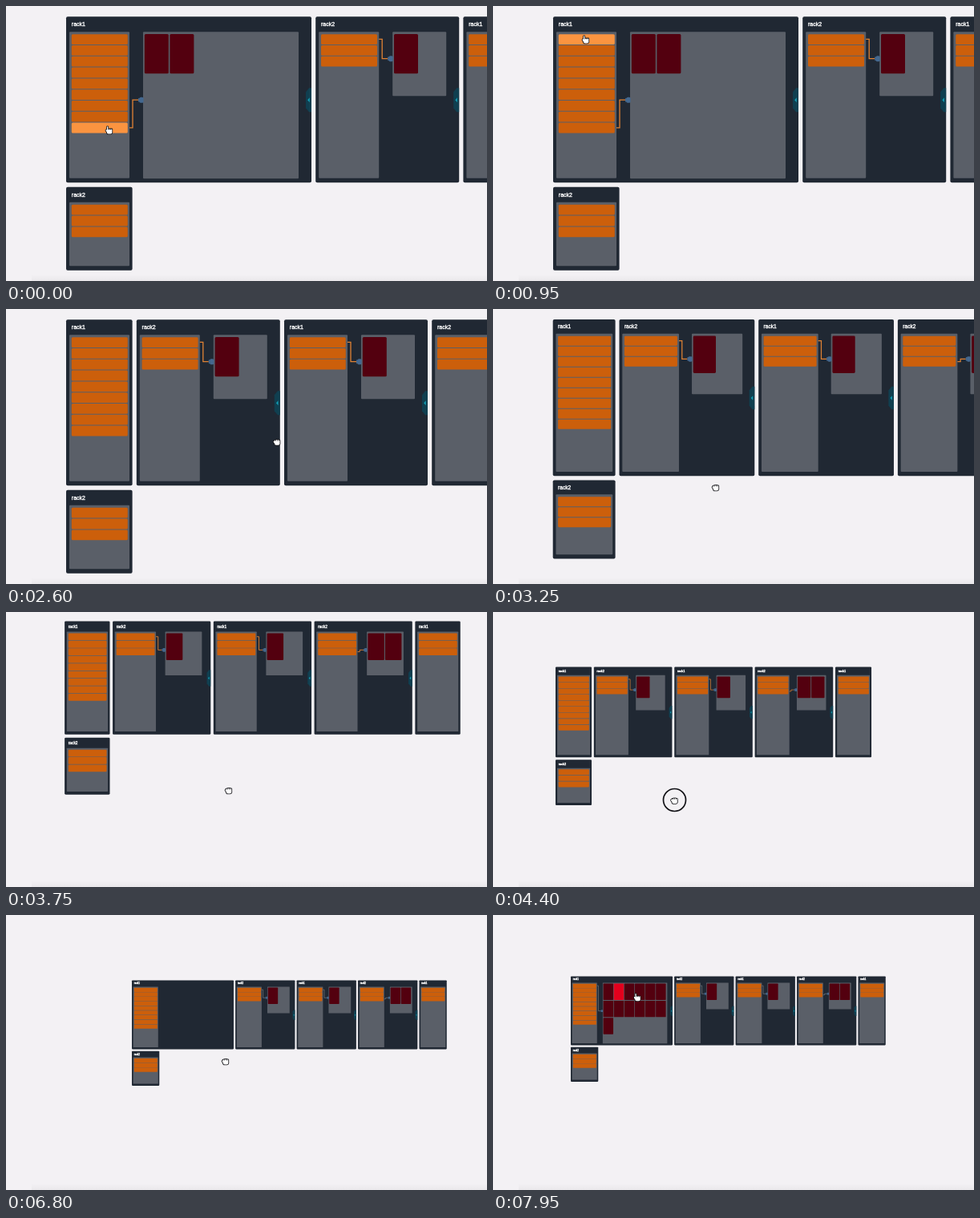
Animation of 600 by 343 pixels, one loop 8 s. Source, as an HTML page with a canvas:

```html
<!DOCTYPE html>
<html lang="en">
<head>
<meta charset="utf-8">
<title>Rack view</title>
<style>
  html, body { margin: 0; height: 100%; overflow: hidden; background: #f3f1f4; }
  canvas { display: block; width: 600px; height: 343px; }
</style>
</head>
<body>
<canvas id="stage" width="600" height="343"></canvas>
<script>
const ctx = document.getElementById('stage').getContext('2d');
const LOOP = 8000;
const COLOR = {
  page: '#f3f1f4', rack: '#202833', slot: '#5a5f68', row: '#cc5f0b', rowHover: '#fb9440',
  cell: '#53000f', cellHover: '#e3001d', wire: '#e08234', wireFar: '#8b8d91',
  plug: '#44688f', tab: '#103f50', arrow: '#10a0b6'
};
const GAP = 5.2, CLOSED = 82.6, HEIGHT = 207;
const ROW_STEP = 13.8, CELL_STEP = { x: 31.6, y: 51.4 };

// The pointer glides to x, y; while dragging it takes the view along by dx, dy.
const legs = [
  { from: 250, to: 950, x: 116, y: 42 },
  { from: 1250, to: 1850, x: 381.5, y: 124.5 },
  { from: 2200, to: 3100, x: 278, y: 222 },
  { from: 4050, to: 4300, x: 220.5, y: 176.5 },
  { from: 4300, to: 4390, dx: 6, dy: 58 },
  { from: 5100, to: 5300, x: 156, y: 154 },
  { from: 5300, to: 5500, dx: 80.5, dy: 2 },
  { from: 5800, to: 6180, x: 172, y: 122 },
  { from: 6350, to: 6780, x: 274, y: 182 },
  { from: 6850, to: 7150, dx: -60, dy: -5 },
  { from: 7150, to: 7560, x: 112, y: 92 },
  { from: 7750, to: 8000, x: 188, y: 104 }
];

const ramp = (t, from, to) => Math.min(1, Math.max(0, (t - from) / (to - from)));
const smooth = p => p * p * (3 - 2 * p);

function cursorAt(t) {
  let x = 129, y = 155;
  for (const leg of legs) {
    const p = smooth(ramp(t, leg.from, leg.to));
    x += (leg.dx ?? leg.x - x) * p;
    y += (leg.dy ?? leg.y - y) * p;
  }
  return { x, y };
}

function viewAt(t) {
  const zoomA = ramp(t, 3160, 4100), zoomB = ramp(t, 4650, 5050);
  const view = {
    x: 75 - 3 * zoomA - 1.5 * zoomB,
    y: 13.2 - 2.7 * zoomA + 11 * zoomB,
    scale: .545 ** zoomA * (.415 / .545) ** zoomB
  };
  for (const leg of legs.filter(l => 'dx' in l)) {
    const p = smooth(ramp(t, leg.from, leg.to));
    view.x += leg.dx * p;
    view.y += leg.dy * p;
  }
  return view;
}

function racksAt(t) {
  const wide = { open: 1, full: 179, detail: true, rows: 3, row: 0, cells: 1, cols: 2, dw: 67, dh: 80 };
  const first = {
    rows: 9, full: 306, cols: 6, dw: 194, dh: 183,
    row: t < 1150 ? 8 : 0,
    cells: t < 1150 ? 2 : 13,
    open: 1 - smooth(ramp(t, 2130, 2330)) + smooth(ramp(t, 6260, 6500)),
    detail: t < 2130 || t > 6870
  };
  const racks = [first, wide, { ...wide }, { ...wide, row: 2, cells: 2 }, { rows: 3, open: 0, full: CLOSED }];
  let x = 0;
  racks.forEach((r, i) => {
    const w = CLOSED + (r.full - CLOSED) * r.open;
    Object.assign(r, { name: 'rack' + (1 + i % 2), x, y: 0, w, h: HEIGHT });
    x += w + GAP;
  });
  return [...racks, { name: 'rack2', rows: 3, x: 0, y: 212.6, w: CLOSED, h: 104 }];
}

function box(x, y, w, h, fill, radius = 1) {
  ctx.fillStyle = fill;
  ctx.beginPath();
  ctx.roundRect(x, y, w, h, radius);
  ctx.fill();
}

function trace(points) {
  ctx.beginPath();
  points.forEach(([x, y]) => ctx.lineTo(x, y));
}

function drawWire(r, scale) {
  const plugY = 12.5 + r.dh / 2, rowY = 28.2 + r.row * ROW_STEP;
  trace([[79, rowY], [83, rowY], [83, plugY], [90, plugY]]);
  ctx.strokeStyle = scale < .5 ? COLOR.wireFar : COLOR.wire;
  ctx.lineWidth = 1.3;
  ctx.stroke();
  box(90, plugY - 2.5, 2, 5, COLOR.plug);
  box(91.5, plugY - 3.5, 5, 7, COLOR.plug, 1.5);
}

function drawTab(right) {
  ctx.save();
  ctx.translate(right, 104);
  trace([[0, -15], [-3, -15], [-7, -10], [-7, 10], [-3, 15], [0, 15]]);
  ctx.fillStyle = COLOR.tab;
  ctx.fill();
  trace([[-2.3, -3], [-4.8, 0], [-2.3, 3]]);
  ctx.fillStyle = COLOR.arrow;
  ctx.fill();
  ctx.restore();
}

function drawRack(r, pointer, scale) {
  ctx.save();
  ctx.translate(r.x, r.y);
  const item = (x, y, w, h, fill, hover) => {
    const dx = pointer.x - r.x - x, dy = pointer.y - r.y - y;
    const hit = dx >= 0 && dx <= w && dy >= 0 && dy <= h;
    box(x, y, w, h, hit ? hover : fill, 1.5);
  };
  box(0, 0, r.w, r.h, COLOR.rack, 2);

  ctx.fillStyle = ctx.strokeStyle = '#fff';
  ctx.font = '7px "Liberation Sans", Arial, sans-serif';
  ctx.lineWidth = .35 / scale;
  ctx.fillText(r.name, 6.8, 11.8);
  ctx.strokeText(r.name, 6.8, 11.8);

  box(4, 19, 75, r.h - 24.5, COLOR.slot);
  for (let i = 0; i < r.rows; i++) {
    item(6.8, 22 + i * ROW_STEP, 70, 12.8, COLOR.row, COLOR.rowHover);
  }
  if (r.detail) {
    box(96, 19, r.dw, r.dh, COLOR.slot);
    for (let i = 0; i < r.cells; i++) {
      const col = i % r.cols, line = Math.floor(i / r.cols);
      item(97.8 + col * CELL_STEP.x, 21.8 + line * CELL_STEP.y, 30, 49.2, COLOR.cell, COLOR.cellHover);
    }
    drawWire(r, scale);
    drawTab(r.w);
  }
  ctx.restore();
}

function handAt(t) {
  if (t < 2300 || t >= 7200) return 'point';
  return t >= 5500 && t < 6700 ? 'open' : 'fist';
}

const fingerLength = {
  point: i => i ? 1 : 4.2,
  open: i => 3.6 - Math.abs(i - 1.3) * .6,
  fist: i => 1.8 - Math.abs(i - 1.5) * .4
};

function drawCursor(t, { x, y }) {
  ctx.save();
  ctx.translate(x, y);
  ctx.strokeStyle = '#111115';
  if (t >= 4300 && t < 4500) {
    ctx.beginPath();
    ctx.arc(0, 0, 14, 0, Math.PI * 2);
    ctx.lineWidth = 1.7;
    ctx.stroke();
  }
  const hand = new Path2D();
  hand.roundRect(-3.2, -.6, 6.6, 5, 2);
  hand.ellipse(-3.2, .8, 1, 1.8, -.6, 0, Math.PI * 2);
  for (let i = 0; i < 4; i++) {
    const length = fingerLength[handAt(t)](i);
    hand.roundRect(-3 + i * 1.7, -.6 - length, 1.25, length + 2, .6);
  }
  ctx.lineWidth = 1.6;
  ctx.stroke(hand);
  ctx.fillStyle = '#fff';
  ctx.fill(hand);
  ctx.restore();
}

function drawPage() {
  ctx.fillStyle = COLOR.page;
  ctx.fillRect(0, 0, 600, 343);
  const shade = ctx.createLinearGradient(0, 335, 0, 343);
  shade.addColorStop(0, 'rgba(228,226,229,0)');
  shade.addColorStop(1, 'rgba(228,226,229,.6)');
  ctx.fillStyle = shade;
  ctx.fillRect(32, 335, 568, 8);
}

function draw(t) {
  const view = viewAt(t);
  // Highlighting trails the pointer slightly.
  const trail = cursorAt(t - 60);
  const pointer = handAt(t) === 'point'
    ? { x: (trail.x - view.x) / view.scale, y: (trail.y - view.y) / view.scale }
    : { x: -99, y: -99 };

  drawPage();
  ctx.save();
  ctx.translate(view.x, view.y);
  ctx.scale(view.scale, view.scale);
  racksAt(t).forEach(r => drawRack(r, pointer, view.scale));
  ctx.restore();
  drawCursor(t, cursorAt(t));
}

const start = performance.now();
function tick() {
  draw((performance.now() - start) % LOOP);
  requestAnimationFrame(tick);
}
tick();
</script>
</body>
</html>
```
